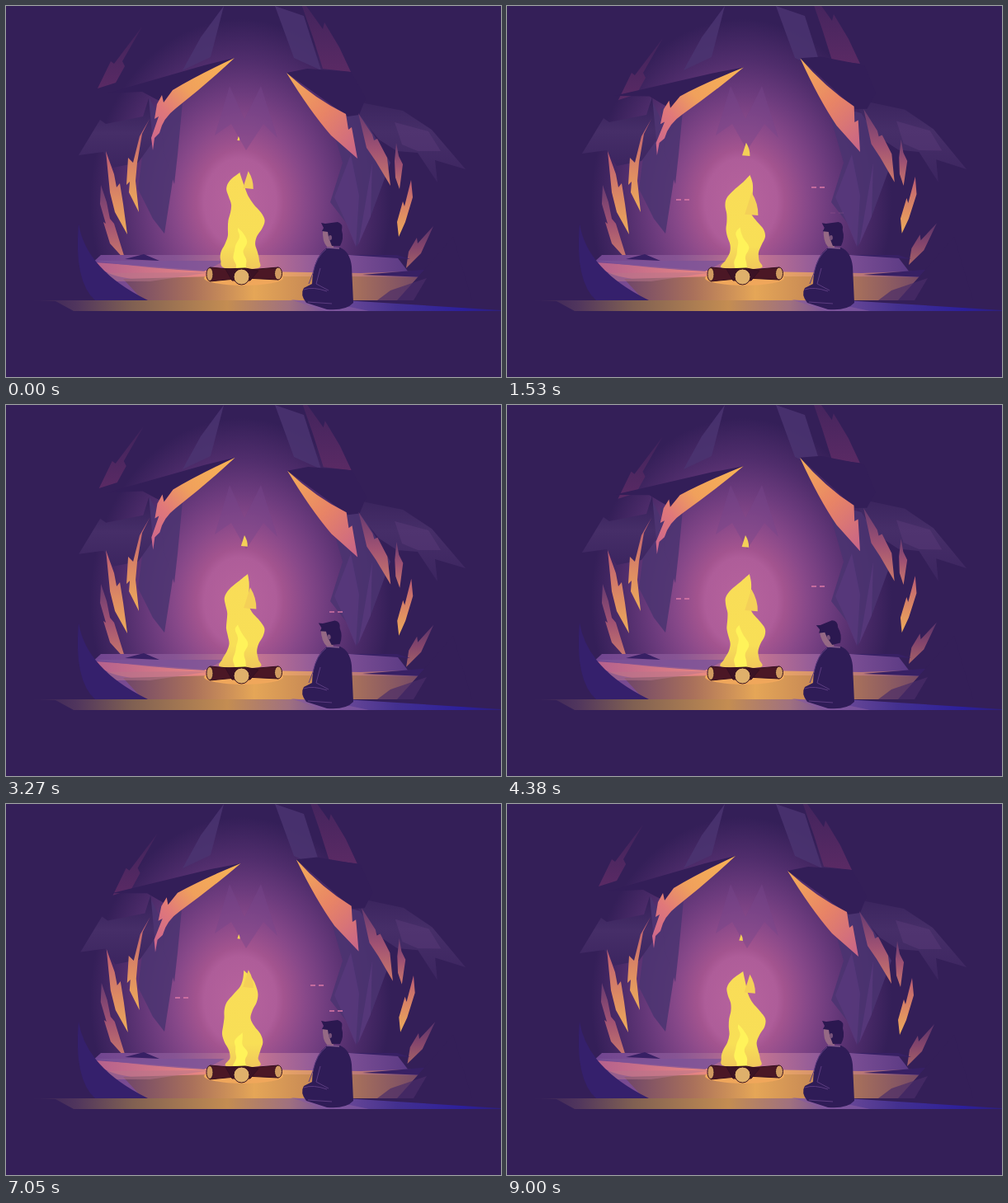
These frames come from a looping animation (600 px wide and 450 px high, 9.03 s). An HTML page:

```html
<!DOCTYPE html>
<html lang="en">
<head>
<meta charset="utf-8">
<title>Campfire in a cave</title>
<style>
html, body { margin: 0; width: 100%; height: 100%; overflow: hidden; background: #341f58; }
svg { display: block; width: 100vw; height: 100vh; }
</style>
</head>
<body>
<svg viewBox="0 0 600 450">
<defs>
  <radialGradient id="glow" gradientUnits="userSpaceOnUse" cx="0" cy="0" r="1" gradientTransform="translate(284 238) scale(182 222)">
    <stop offset="0" stop-color="#b7639d"/><stop offset=".24" stop-color="#ae5d99"/>
    <stop offset=".29" stop-color="#a3548f"/><stop offset=".44" stop-color="#874889"/>
    <stop offset=".6" stop-color="#6c3b7d"/><stop offset=".78" stop-color="#502d6c"/>
    <stop offset="1" stop-color="#341f58"/>
  </radialGradient>
  <linearGradient id="blade" x1="1" y1="0" x2="0" y2="1">
    <stop offset="0" stop-color="#f8b455"/><stop offset=".45" stop-color="#f0a05c"/>
    <stop offset=".7" stop-color="#e0787a"/><stop offset="1" stop-color="#c96490"/>
  </linearGradient>
  <linearGradient id="bladeR" x1="0" y1="0" x2="1" y2="1">
    <stop offset="0" stop-color="#f4ad58"/><stop offset=".5" stop-color="#e88466"/><stop offset="1" stop-color="#c66389"/>
  </linearGradient>
  <linearGradient id="leaf" x1="0" y1="0" x2="0" y2="1">
    <stop offset="0" stop-color="#b95a75"/><stop offset=".6" stop-color="#df8d62"/><stop offset="1" stop-color="#edac5a"/>
  </linearGradient>
  <linearGradient id="plum" x1="0" y1="0" x2="0" y2="1">
    <stop offset="0" stop-color="#663a70"/><stop offset=".5" stop-color="#a05273"/><stop offset="1" stop-color="#cd7a6b"/>
  </linearGradient>
  <linearGradient id="red" x1="0" y1="0" x2="0" y2="1">
    <stop offset="0" stop-color="#3f235c"/><stop offset="1" stop-color="#5a2a64"/>
  </linearGradient>
  <linearGradient id="wing" x1="0" y1="0" x2="0" y2="1">
    <stop offset="0" stop-color="#341f58"/><stop offset=".5" stop-color="#462e68"/><stop offset="1" stop-color="#3c2560"/>
  </linearGradient>
  <linearGradient id="floor">
    <stop offset="0" stop-color="#6f4490"/><stop offset=".25" stop-color="#865493"/><stop offset=".48" stop-color="#c77691"/>
    <stop offset=".7" stop-color="#87569a"/><stop offset="1" stop-color="#4f327e"/>
  </linearGradient>
  <linearGradient id="pink">
    <stop offset="0" stop-color="#b3608d"/><stop offset=".3" stop-color="#e58484"/>
    <stop offset=".5" stop-color="#f5b061"/><stop offset=".8" stop-color="#b97778"/><stop offset="1" stop-color="#664080"/>
  </linearGradient>
  <linearGradient id="gold">
    <stop offset="0" stop-color="#6e4569"/><stop offset=".22" stop-color="#a9705b"/><stop offset=".42" stop-color="#e5a657"/>
    <stop offset=".62" stop-color="#c58755"/><stop offset="1" stop-color="#694069"/>
  </linearGradient>
  <linearGradient id="slab" gradientUnits="userSpaceOnUse" x1="28" y1="0" x2="600" y2="0">
    <stop offset="0" stop-color="#341f58"/><stop offset=".1" stop-color="#50355d"/><stop offset=".22" stop-color="#806052"/>
    <stop offset=".42" stop-color="#c48d52"/><stop offset=".55" stop-color="#a0717f"/><stop offset=".63" stop-color="#76509a"/>
    <stop offset=".78" stop-color="#43308f"/><stop offset=".92" stop-color="#2c1f9c"/><stop offset="1" stop-color="#2f1f78"/>
  </linearGradient>
  <linearGradient id="fire" gradientUnits="userSpaceOnUse" x1="0" y1="198" x2="0" y2="320">
    <stop offset="0" stop-color="#f9dc58"/><stop offset=".76" stop-color="#f8df56"/><stop offset="1" stop-color="#f0c75b"/>
  </linearGradient>
</defs>

<path fill="#341f58" d="M0 0H600V450H0Z"/>
<path fill="#2d1b6c" opacity=".6" d="M0 98Q18 73 48 68L37 83 53 98 36 120 24 108 0 132Z"/>
<path fill="url(#glow)" d="M0 0H600V303H0Z"/>

<!-- far rock -->
<g fill="#4b3471" opacity=".85">
  <path d="M264 0L236 38 214 78 248 62Z"/><path d="M326 0L361 12 382 78 349 63Z"/>
  <path d="M174 112L188 140 207 180 192 276 178 258 160 222Z"/><path d="M186 125L214 116 208 180 204 216 192 180Z"/>
  <path d="M388 120L408 190 393 238 414 265 425 292 441 258 466 190 430 130Z"/>
</g>
<path fill="#76458a" opacity=".45" d="M253 157L271 97 289 137 309 97 329 160 312 143 291 175 273 143Z"/>
<path fill="#5b397e" opacity=".7" d="M418 180L398 232 410 258 424 292 428 230ZM444 190L427 290 442 255Z"/>

<!-- watching eyes -->
<g stroke="#dc7aa6" stroke-width="1.6">
  <path id="eyes" d="M205 235h6m4 0h6M369 220h6m4 0h6"/>
  <path id="eyesLow" d="M392 251h6m4 0h6"/>
</g>

<!-- outer walls -->
<path id="redL" fill="url(#red)" d="M175 30L151 72 154 78 143 98 121 105 137 72 141 75Z"/>
<path id="redR" fill="url(#red)" d="M354 -14L384 28 386 20 404 50 418 80 384 76 372 38Z"/>
<g id="wingL"><path fill="url(#wing)" d="M88 181L114 138 121 143 166 134 173 112 178 165 160 190 130 196 118 177Z"/></g>
<g id="wingR"><path fill="url(#wing)" d="M400 92L435 118 481 127 516 150 557 198 520 187 523 214 499 178 474 176 452 162 428 132Z"/>
  <path fill="#5a3b78" opacity=".5" d="M471 141L512 152 527 176 499 176 480 168Z"/></g>

<g id="bigL">
  <path fill="#331e58" d="M277 63L240 72 122 106 165 104 180 112 192 118Z"/>
  <path fill="url(#blade)" d="M277 63Q245 93 206 124 190 136 186 154L180 160 178 175 176 160 185 134 180 137 183 119 189 108 191 117 202 102Q232 84 277 63Z"/>
</g>
<g id="bigR">
  <path fill="#331e58" d="M340 81L365 76 418 80 436 112 428 132 414 134Z"/>
  <path fill="url(#bladeR)" d="M340 81Q375 113 412 131L415 150 419 147 426 185 394 157Q368 127 340 81Z"/>
</g>
<g id="smallL">
  <path fill="url(#leaf)" d="M174 137L165 155 159 190 157 212 161 250 149 226 150 213 146 217 148 184 154 190 162 158Z"/>
  <path fill="url(#leaf)" d="M121 176L131 204 134 220 138 215 142 240 147 277 132 250 126 226Z"/>
  <path fill="url(#plum)" d="M115 217L122 238 126 258 131 264 145 309 126 288 118 262 121 264 114 240Z"/>
</g>
<g id="smallR">
  <path fill="url(#plum)" d="M427 130L444 156 446 163 450 161 462 184 466 218 448 188 437 172Z"/>
  <path fill="url(#plum)" d="M473 166L476 182 481 192 477 222 472 208 471 188Z"/>
  <path fill="url(#leaf)" d="M491 211L493 232 484 262 476 280 474 262 481 237 483 243Z"/>
  <path fill="url(#plum)" opacity=".75" d="M518 267L503 300 485 318 488 298 498 281 499 288Z"/>
</g>

<!-- ground -->
<path fill="url(#floor)" d="M115 302H472L514 357H170Q130 342 102 314Z"/>
<path fill="url(#pink)" d="M108 311L242 321 430 324 512 321 500 331H152Q116 326 108 311Z"/>
<path fill="#7c5399" opacity=".75" d="M105 309H265L240 322Q170 318 105 309Z"/>
<path fill="url(#gold)" d="M142 331L250 328H420L520 329 510 357H166Z"/>
<path fill="#b7768a" opacity=".5" d="M100 324L248 323 175 334 125 334Z"/>
<ellipse cx="288" cy="330" rx="48" ry="9" fill="#f0a75b"/>
<path fill="#372064" d="M144 307L167 301 186 309ZM416 302H474L490 307ZM432 326L515 319 510 329Z"/>
<path fill="#35206c" d="M88 264Q97 320 172 357H108Q82 334 88 264Z"/>
<path fill="#341f58" d="M542 280Q507 320 474 357H565Z"/>
<path fill="#4b2d68" opacity=".7" d="M466 345L510 330 494 357H450Z"/>
<path fill="url(#slab)" d="M28 357H410L600 369V370H82L60 358Z"/>
<path fill="#8459a0" opacity=".65" d="M345 356L398 361 440 370H388Z"/>
<path fill="#341f58" d="M0 370H600V450H0Z"/>

<!-- fire -->
<path id="flame" fill="url(#fire)"/>
<path id="wisps" fill="#f4d058"/>
<path id="core" fill="#fff35a"/>
<g stroke="#35101f">
  <path fill="#4b1725" d="M247 317L281 320 278 331 247 334ZM330 317L294 320 290 330 330 332Z"/>
  <path fill="#3b1224" d="M266 319L290 318 306 321 296 333H274Z"/>
  <ellipse cx="247" cy="325.500" rx="4" ry="8" fill="#d09a61"/><ellipse cx="330" cy="324.500" rx="4.500" ry="7.500" fill="#d09a61"/>
  <circle cx="285.500" cy="328.500" r="9.500" fill="#dfb06b"/>
</g>

<!-- sitter -->
<path fill="#2f1c57" d="M388 294L405 293Q417 298 419 316L421 360Q412 370 389 368L364 360Q356 350 361 342L371 337Q372 306 388 294Z"/>
<path fill="none" stroke="#5c3c80" d="M388 295Q376 304 372 324L367 337M361 344Q372 340 389 346M381 318L376 337 391 345M366 359L395 361"/>
<path stroke="#81588d" stroke-width="1.500" d="M389 293L404 294"/>
<g id="head">
  <path fill="#956985" d="M384 270L393 271 397 293 389 292Q383 286 384 270Z"/>
  <path fill="#2b1850" d="M382 263L387 264 402 262Q409 264 407 272 410 282 405 291L395 291Q393 286 391 280L390 274 383 273 385 269Z"/>
  <ellipse cx="393" cy="281" rx="2" ry="3" fill="#77527a"/>
</g>
</svg>

<script>
const LOOP = 9030, STEP = 30, TAU = 2 * Math.PI;
const SWAYS = 3, LICKS = 16; // cycles in one loop
const BASE = 318;

const $ = id => document.getElementById(id);
const wave = turns => Math.sin(TAU * turns);
const clamp = x => Math.min(1, Math.max(0, x));
const ease = x => .5 - Math.cos(Math.PI * clamp(x)) / 2;
const mix = (a, b, x) => a + (b - a) * x;

// Curve through the points, sharp at the first and last.
function curve(p) {
  let d = 'M' + p[0];
  for (let i = 1; i < p.length; i++) {
    const a = p[i - 1], b = p[i], before = p[i - 2] || a, after = p[i + 1] || b;
    const c1 = a.map((v, k) => v + (b[k] - before[k]) / 6);
    const c2 = b.map((v, k) => v - (after[k] - a[k]) / 6);
    d += `C${c1} ${c2} ${b}`;
  }
  return d + 'Z';
}

// A tongue whose spine and width ripple upwards.
function tongue(x, height, width, lick) {
  const left = [], right = [], n = 12;
  for (let i = 0; i <= n; i++) {
    const s = i / n, y = BASE - height * s;
    const spine = x + height * (.02 + .055 * s) * wave(1.4 * s - .45 - lick);
    const w = width * (1 - s) ** .75 * (.78 + s) * (1 + .16 * wave(2.5 * s - lick));
    left.push([spine - w, y]);
    right.unshift([spine + w, y]);
  }
  return curve([...right.slice(0, -1), right.at(-1), ...left, right[0]]);
}

// A scrap of flame that tears off beside the tip, rises and shrinks.
function wisp(life) {
  const rise = clamp(life / .7) ** 2, h = 31 * (1 - life) ** .6;
  const x = mix(297, 289, rise) - 9 * clamp(life * 4 - 3), y = mix(230, 158, rise);
  return `M${x} ${y}Q${x + h * .3} ${y + h * .5} ${x + h * .28} ${y + h}L${x - h * .3} ${y + h * .95}Z`;
}

function draw(now) {
  const t = Math.floor(now % LOOP / STEP) * STEP, turn = t / LOOP;
  const move = (id, x, y, angle = 0, cx = 0, cy = 0) =>
    $(id).setAttribute('transform', `translate(${x} ${y}) rotate(${angle} ${cx} ${cy})`);

  const sway = .5 - .5 * Math.cos(TAU * SWAYS * turn);
  move('bigL', 4 * sway, 6 * sway, 3.1 * sway, 178, 172);
  move('bigR', 2 * sway, -8 * sway, 7 * sway, 426, 185);
  move('smallL', sway, 0);
  move('smallR', 2 * sway, -4 * sway, sway, 485, 318);
  move('wingL', 3 * sway, -2 * sway);
  move('wingR', 0, 0, sway, 557, 198);
  move('redL', 24 * sway - 10, 14 * sway - 5);
  move('redR', 10 * sway, -10 * sway);

  // The head sinks slowly and comes up with a start.
  const nod = clamp(t / 5600) ** 3 * (1 - ease((t - 5700) / 500));
  move('head', 0, 0, -30 * nod, 395, 294);
  $('eyes').style.opacity = clamp(3 * sway - 1.3);
  $('eyesLow').style.opacity = clamp(.2 + Math.cos(2 * TAU * (turn - .3)));

  const lick = turn * LICKS;
  $('flame').setAttribute('d', tongue(286, 116 + 3 * wave(lick), 25, lick));
  $('core').setAttribute('d', tongue(284, 45 + 7 * wave(lick + .4), 8, lick + .3));
  $('wisps').setAttribute('d', wisp((lick + .95) % 1) + wisp((lick + .45) % 1));
  requestAnimationFrame(draw);
}
requestAnimationFrame(draw);
</script>
</body>
</html>
```
